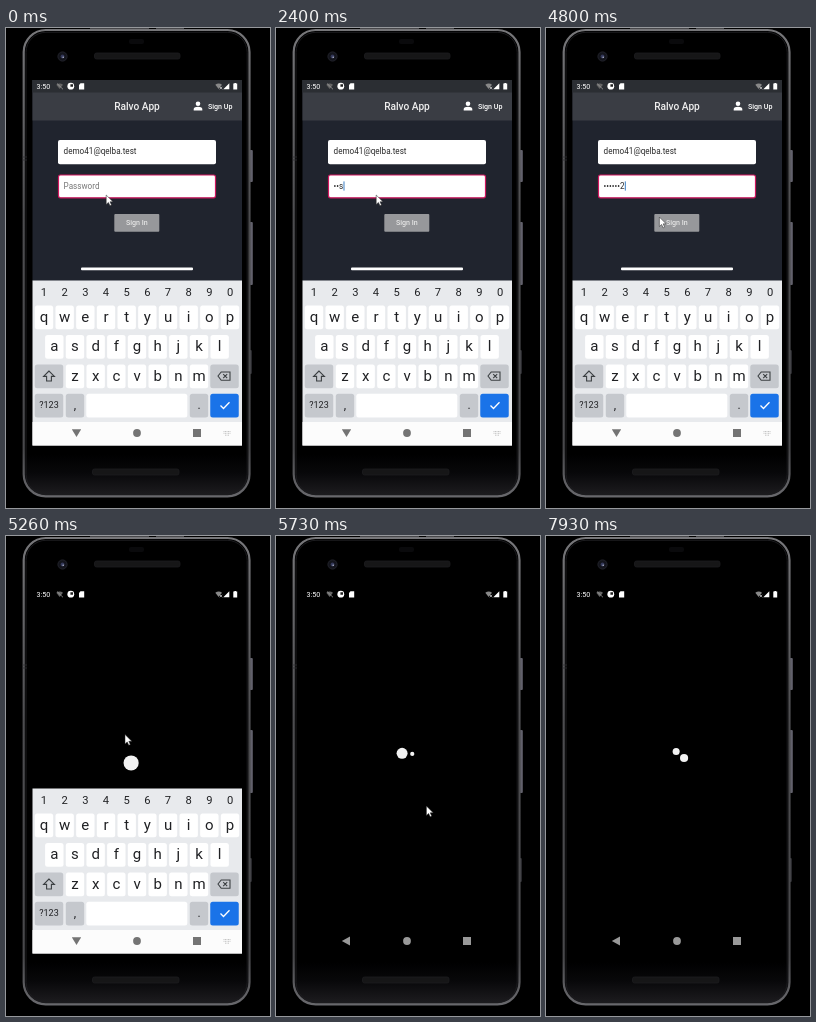
These frames come from a looping animation (264 px wide and 480 px high, 8000 ms). An HTML page:

```html
<!DOCTYPE html>
<html lang="en">
<head>
<meta charset="utf-8">
<title>Sign in</title>
<style>
html, body { margin: 0; width: 100%; height: 100%; overflow: hidden; background: #000; }
svg { display: block; width: 100%; height: 100%; font-family: Roboto, sans-serif; }
.mid { text-anchor: middle; }
.bold { font-weight: 500; }
</style>
</head>
<body>
<svg viewBox="0 0 264 480">
  <defs>
    <linearGradient id="shell" x2="0" y2="1">
      <stop offset=".91" stop-color="#000"/>
      <stop offset=".95" stop-color="#08080a"/>
      <stop offset="1" stop-color="#1e1d20"/>
    </linearGradient>
    <linearGradient id="rim" x2="0" y2="1">
      <stop offset="0" stop-color="#77777a"/>
      <stop offset=".1" stop-color="#6a6a6d"/>
      <stop offset=".4" stop-color="#4c4c4f"/>
      <stop offset=".9" stop-color="#48484b"/>
      <stop offset="1" stop-color="#68686c"/>
    </linearGradient>
    <clipPath id="screen"><path d="M26.5 52H236V417.5H26.5Z"/></clipPath>
  </defs>

  <!-- phone -->
  <g fill="#62616c">
    <rect x="243.5" y="122" width="3.3" height="32" rx="1"/>
    <rect x="243.5" y="194" width="3.3" height="63" rx="1"/>
    <rect x="243.5" y="322" width="2.2" height="24" rx="1" fill="#3a3a3f"/>
  </g>
  <path d="M84 .8H143M150 .8H178" stroke="#66666a"/>
  <rect x="17.7" y="2" width="225.8" height="466.3" rx="22" fill="url(#shell)" stroke="url(#rim)" stroke-width="2.2"/>
  <rect x="20" y="4.3" width="221.2" height="462" rx="20" fill="none" stroke="#1c1c1f"/>
  <path d="M16.5 129H21M16.5 132H21" stroke="#303034" stroke-width=".8"/>
  <g fill="#161617" stroke="#1e1e20" stroke-width=".8">
    <rect x="88.5" y="25" width="85.5" height="6" rx="2"/>
    <rect x="86.5" y="441" width="86.5" height="6" rx="2"/>
  </g>
  <rect x="123" y="11" width="15" height="5" rx="2" fill="#0a0a0c"/>
  <circle cx="56.5" cy="28.5" r="4.6" fill="#13141b" stroke="#22232b"/>
  <circle cx="56.5" cy="28.5" r="1.9" fill="#34395a"/>
  <circle cx="57.2" cy="29.2" r=".8" fill="#b4b8cc"/>

  <g clip-path="url(#screen)">
    <path d="M26 52H236V418H26Z"/>
    <g fill="#999">
      <path d="M65.8 405L74 400.6V409.4Z"/>
      <circle cx="131" cy="405" r="3.9"/>
      <path d="M187 401H195V409H187Z"/>
    </g>

    <g id="form">
      <path d="M26 52H236V253H26Z" fill="#20242e"/>
      <path d="M26 52H236V92.5H26Z" fill="#3a3d44"/>
      <path d="M26 52H236V64.5H26Z" fill="#2b2e33"/>
      <text class="mid bold" x="131" y="82" font-size="10.16" fill="#eee">Ralvo App</text>
      <g fill="#fff">
        <circle cx="192" cy="75.7" r="2.3"/>
        <path d="M187.7 82.5V81C187.7 78 196.3 78 196.3 81V82.5Z"/>
        <text class="bold" x="202" y="81" font-size="7.1">Sign Up</text>
      </g>
      <rect x="52" y="112" width="158" height="24.3" rx="2" fill="#fff"/>
      <rect id="field" x="52.5" y="147" width="157" height="22.8" rx="2" fill="#fff" stroke="#d0175f" stroke-width="1.2"/>
      <g font-size="8.13" fill="#2a2a2a">
        <text x="57.6" y="126.4">demo41@qelba.test</text>
        <text id="hint" x="57.6" y="160.6" fill="#777">Password</text>
        <text id="pass" x="57.6" y="160.6"></text>
      </g>
      <rect id="caret" y="153.4" width="1" height="9.2" fill="#3b7fc4"/>
      <rect x="108.3" y="186" width="45" height="17.7" rx="1" fill="#97989b"/>
      <text class="mid bold" x="130.8" y="197.4" font-size="7.1" fill="#e6e6e6">Sign In</text>
      <rect x="75" y="239.4" width="112" height="2.8" rx="1" fill="#fff"/>
    </g>

    <!-- status bar -->
    <g fill="#fff">
      <text x="30.5" y="61" font-size="7.1">3:50</text>
      <path d="M50.3 56.8Q53.7 54 57 56.8L53.7 61Z" fill="#666"/>
      <path d="M51 55.5L57 61.3" stroke="#aaa" stroke-width=".7"/>
      <circle cx="64.8" cy="58.2" r="3.4"/>
      <path d="M64.4 58.8V56.2H67V58.8Z" fill="#222"/>
      <path d="M73 57L74.5 55.2H78.2V61.5H73Z"/>
      <path d="M209.3 56.8Q212.7 54 216 56.8L212.7 61Z" fill="#888"/>
      <path d="M213.8 58.8L216.2 61.3M216.2 58.8L213.8 61.3" stroke="#ddd" stroke-width=".7"/>
      <path d="M217.3 61.3L223.3 55.3V61.3Z"/>
      <path d="M227.3 55.6H228.4V54.9H230.1V55.6H231.2V61.5H227.3Z"/>
    </g>

    <g id="keyboard">
      <path d="M26 252.5H236V418H26Z" fill="#e8eaed"/>
      <path d="M26 394H236V418H26Z" fill="#fcfcfc"/>
      <g id="keys"></g>
      <g fill="none" stroke="#3c4043" stroke-width="1.1">
        <path d="M43 343L37.6 348.4H40.6V353H45.4V348.4H48.4Z"/>
        <path d="M212 348L215.2 344H224V352.3H215.2ZM217.2 346.2L221.2 350.2M221.2 346.2L217.2 350.2"/>
        <path d="M214.5 377.5L217.5 380.5L223.5 374.3" stroke="#fff" stroke-width="1.3"/>
      </g>
      <g fill="#747474">
        <path d="M65.8 401.2H75.2L70.5 409Z"/>
        <circle cx="131" cy="405" r="3.9"/>
        <path d="M187 401H195V409H187Z"/>
      </g>
      <path d="M217.5 403.5H225M217.5 405.3H225M219 407.2H223.5" stroke="#c4c4c4" stroke-dasharray="1 .5"/>
    </g>

    <g id="spinner" fill="#f2f2f2"><circle/><circle/></g>
  </g>
  <path id="mouse" d="M0 0V9.4L2.2 7.4L3.8 10.8L5.3 10.1L3.8 6.8H6.8Z" fill="#fff" stroke="#222" stroke-width=".5"/>
</svg>
<script>
const $ = id => document.getElementById(id);
const LOOP = 8000, SUBMIT = 5245, SPIN_START = 5214;
const clamp = x => Math.min(1, Math.max(0, x));
const lerp = (a, b, p) => a + (b - a) * p;
const show = (el, on) => el.setAttribute('visibility', on ? 'visible' : 'hidden');

// keyboard
let keys = '';
function key(x, y, w, label, fill = '#fff', size = 15) {
  if (fill) keys += `<rect x="${x - w / 2}" y="${y - 11.6}" width="${w}" height="23.8" rx="2.5" fill="${fill}"/>`;
  keys += `<text class="mid" x="${x}" y="${y + size * .32}" font-size="${size}" fill="#202124">${label}</text>`;
}
const row = (chars, x, y, fill, size) =>
  [...chars].forEach((c, i) => key(x + i * 20.67, y, 18.4, c, fill, size));
const GREY = '#c5c8cd';
row('1234567890', 38, 264, '', 11.2);
row('qwertyuiop', 38, 289);
row('asdfghjkl', 48.3, 318.5);
row('zxcvbnm', 69, 348);
key(43, 348, 28.5, '', GREY);
key(218.5, 348, 28.5, '', GREY);
key(43, 377.3, 28.5, '?123', GREY, 9);
key(69, 377.3, 18.4, ',', GREY, 12);
key(130.8, 377.3, 101, '');
key(193, 377.3, 18.4, '.', GREY, 12);
key(218.5, 377.3, 28.5, '', '#1a73e8');
$('keys').innerHTML = keys;

// time each character is typed
const typed = [[2130, 't'], [2260, 'e'], [2400, 's'], [2530, 't'], [3530, '0'], [3660, '0'], [3800, '2']];
// times the caret switches, starting hidden
const blinks = [160, 660, 1200, 1660, 2130, 3000, 3530, 4260, 4730, 5230];
// pointer stops: time, x, y
const stops = [[0, 100.2, 167], [4590, 100.2, 167], [4930, 119, 198.5], [5330, 119, 198.5],
  [5720, 150.4, 270], [6120, 150.4, 270], [6560, 209.5, 262], [6900, 209.5, 262]];

// cubic-bezier(.42, 0, .58, 1)
function easeInOut(x) {
  let lo = 0, hi = 1, s;
  for (let i = 0; i < 20; i++) {
    s = (lo + hi) / 2;
    const at = 3 * s * (1 - s) * (.42 * (1 - s) + .58 * s) + s ** 3;
    if (at < x) lo = s; else hi = s;
  }
  return s * s * (3 - 2 * s);
}

function drawForm(t) {
  const chars = typed.filter(k => t >= k[0]);
  const n = chars.length;
  $('pass').textContent = n ? '•'.repeat(n - 1) + chars[n - 1][1] : '';
  show($('hint'), !n);
  const width = n ? $('pass').getComputedTextLength() : 0;
  $('caret').setAttribute('x', 57.8 + width);
  show($('caret'), blinks.filter(b => t >= b).length % 2);
  $('form').style.display = t < SUBMIT ? '' : 'none';
}

function drawSpinner(t) {
  show($('spinner'), t >= SUBMIT);
  const turns = Math.max(0, t - SPIN_START) / 2000;
  const phase = turns % 2;
  const v = Math.abs(2 * easeInOut(phase < 1 ? phase : 2 - phase) - 1);
  [[135, v], [225, 1 - v]].forEach(([deg, scale], i) => {
    const a = (deg + turns * 360) * Math.PI / 180;
    const dot = $('spinner').children[i];
    dot.setAttribute('cx', 130.9 + 7.2 * Math.cos(a));
    dot.setAttribute('cy', 222.7 + 7.2 * Math.sin(a));
    dot.setAttribute('r', 7.6 * scale);
  });
}

function drawMouse(t) {
  const i = Math.max(1, stops.findIndex(s => s[0] > t));
  const [t0, x0, y0] = stops[i - 1], [t1, x1, y1] = stops[i];
  const p = easeInOut(clamp((t - t0) / (t1 - t0)));
  $('mouse').setAttribute('transform', `translate(${lerp(x0, x1, p)} ${lerp(y0, y1, p)})`);
  show($('mouse'), t < 6900);
}

function frame() {
  const t = performance.now() % LOOP;
  drawForm(t);
  drawSpinner(t);
  drawMouse(t);
  const drop = clamp((t - 5300) / 260);
  $('keyboard').setAttribute('transform', `translate(0 ${168 * drop * drop})`);
  requestAnimationFrame(frame);
}
frame();
</script>
</body>
</html>
```
